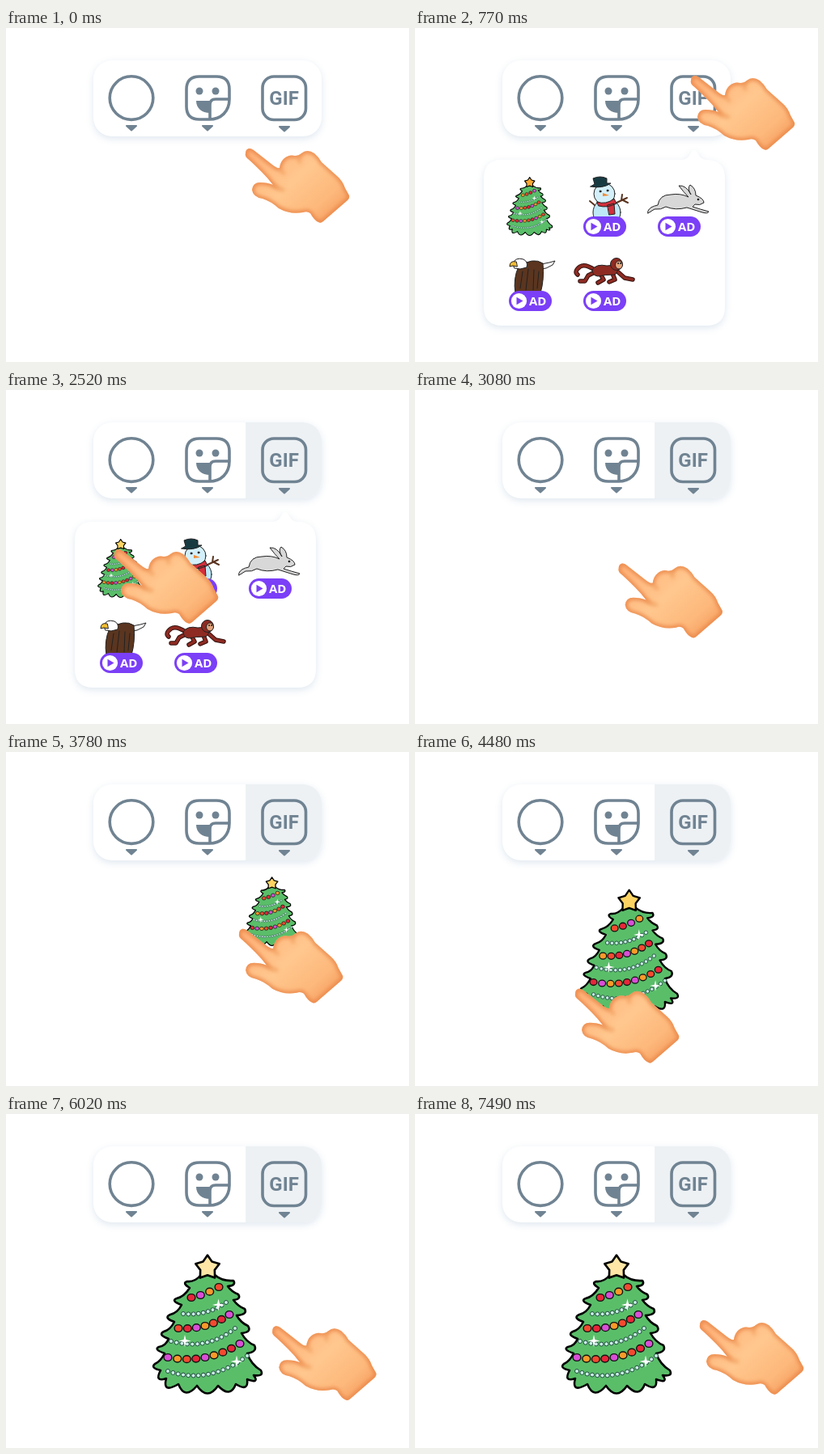
Recreate the animation shown at these times as an HTML page. Size 498 by 413 pixels, loop 7630 ms.

```html
<!DOCTYPE html>
<html lang="en">
<head>
<meta charset="utf-8">
<title>Sticker picker</title>
<style>
html, body { margin: 0; width: 100%; height: 100%; overflow: hidden; background: #fff; }
svg { display: block; width: 498px; height: 413px; }
.card { fill: #fff; filter: drop-shadow(0 3px 5px #e0e8f0); }
.icon { fill: none; stroke: #708392; stroke-width: 3.6; stroke-linejoin: round; stroke-linecap: round; }
.solid { fill: #708392; }
.gif { font: bold 24px Roboto, Arial, sans-serif; }
.ad { font: bold 15px "Open Sans", Arial, sans-serif; fill: #fff; }
.ink { stroke: #000; stroke-linejoin: round; stroke-linecap: round; }
.thin { stroke: #222; stroke-width: 1; stroke-linejoin: round; stroke-linecap: round; }
</style>
</head>
<body>
<svg viewBox="0 0 498 413">
  <defs>
    <clipPath id="barClip"><rect x="108" y="40" width="282" height="94" rx="23"/></clipPath>
    <linearGradient id="skin" x1="0" y1="0" x2="1" y2=".8">
      <stop offset="0" stop-color="#ffb077"/>
      <stop offset=".5" stop-color="#ffc78e"/>
      <stop offset=".8" stop-color="#fdb87b"/>
      <stop offset="1" stop-color="#f59e5f"/>
    </linearGradient>
    <filter id="soft" x="-20%" y="-20%" width="140%" height="140%"><feGaussianBlur stdDeviation="2.4"/></filter>
    <path id="handShape" d="M1 7C1 1 6-1 11 3L34 21Q40 26 43 25Q44 17 49 13Q55 8 62 10Q67 10 70 7Q77 1 86 7Q92 12 95 18L114 35Q121 41 124 50L129 59Q130 62 127 65L97 91Q94 94 91 92Q86 90 81 81Q77 78 72 80Q56 83 42 75Q32 66 22 63Q10 61 9 52Q10 43 19 43Q28 43 35 46Q29 38 21 30Q8 17 3 13Q0 10 1 7Z"/>
    <clipPath id="handClip"><use href="#handShape"/></clipPath>
    <g id="badge">
      <rect width="53" height="25" rx="12.5" fill="#7b3ff7"/>
      <circle cx="12.5" cy="12.5" r="9.6" fill="#fff"/>
      <path d="M9.5 7.8L17.5 12.5L9.5 17.2Z" fill="#7b3ff7"/>
      <text class="ad" x="25" y="18">AD</text>
    </g>
    <g id="tree">
      <path class="ink" fill="#5abe69" stroke-width="2.6" d="M240 200Q233 208 224 207Q217 209 227 215Q220 226 211 228Q203 231 217 236Q212 246 203 248Q194 252 208 257Q203 267 195 269Q187 273 201 278Q197 287 189 288Q182 291 196 296Q191 306 184 309Q178 314 191 317Q183 332 198 327Q193 346 213 334Q221 354 236 336Q249 355 262 336Q277 352 284 334Q300 344 298 328Q314 334 306 323Q319 325 315 317Q303 310 298 296Q311 294 307 286Q297 282 291 271Q304 270 299 262Q290 258 285 249Q299 248 295 241Q287 238 281 230Q291 229 287 223Q279 220 274 213Q285 212 281 206Q267 207 258 199Z"/>
      <g id="lights"></g>
      <path id="star" class="ink" stroke-width="2.6"/>
      <path id="sparkles" fill="#fff"/>
    </g>
  </defs>

  <rect class="card" x="108" y="40" width="282" height="94" rx="23"/>
  <g clip-path="url(#barClip)"><rect id="highlight" x="296" y="40" width="94" height="94" fill="#edf1f4"/></g>
  <g class="icon">
    <circle cx="155" cy="86.6" r="26.8"/>
    <path d="M276 88V76Q276 60 260 60H239Q223 60 223 76V97Q223 113 239 113H251C266 113 276 103 276 88H259Q252 88 252 95V113"/>
    <rect x="317" y="60" width="53.5" height="53.5" rx="14"/>
  </g>
  <g class="solid">
    <circle cx="239" cy="78" r="4.5"/><circle cx="259" cy="78" r="4.5"/>
    <path d="M235 90H252V105C242 105 235 99 235 90Z"/>
    <path stroke="#708392" stroke-width="2" stroke-linejoin="round" d="M149 121H161L155 126.5ZM243 121H255L249 126.5ZM338 122H350L344 127.5Z"/>
    <text class="gif" x="343.6" y="95.3" text-anchor="middle">GIF</text>
  </g>

  <g id="panel">
    <path class="card" d="M107 163H330Q336 163 340 156Q345 146 350 156Q354 163 360 163Q383 163 383 186V345Q383 368 360 368H108Q85 368 85 345V186Q85 163 107 163Z"/>
    <use id="smallTree" href="#tree"/>
    <g class="thin">
      <path fill="none" stroke="#5a3420" stroke-width="2" d="M247 217L262 210M255 213L256 206M257 213L263 216M222 219L216 214"/>
      <circle cx="237" cy="228" r="17" fill="#bfe8f7"/>
      <circle cx="234" cy="205" r="13" fill="#d3f0fa"/>
      <path fill="#d32f3c" d="M225 215Q236 219 246 211L249 217Q238 223 227 220ZM238 219L246 217L247 230L240 231Z"/>
      <path fill="#183b42" d="M217 196L222 193L220 186Q229 182 237 186L237 192L242 192Q232 199 217 196Z"/>
      <path fill="#f08a32" stroke="none" d="M232 204L240 207L232 208Z"/>
      <circle cx="229" cy="202" r="1"/><circle cx="238" cy="201" r="1"/>
    </g>
    <path class="thin" fill="#d8d8d8" d="M288 226Q290 221 300 219Q302 206 316 206Q328 204 338 209Q332 203 326 195Q335 194 341 206Q336 198 340 194Q347 198 347 207Q357 211 357 216Q352 220 346 218L343 221Q352 224 363 227Q362 230 355 228L336 222Q322 226 310 221Q304 225 296 224L288 229Z"/>
    <circle cx="350" cy="212" r="1.3"/>
    <g class="thin">
      <path fill="#fff" d="M156 292L166 290L173 288L170 293L162 297L155 298Z"/>
      <path fill="#5b351f" d="M128 295Q146 283 158 291Q160 310 155 328H124Q121 310 128 295Z"/>
      <path fill="none" d="M133 301L130 322M140 298L137 324M147 299L146 324M153 301L151 322"/>
      <path fill="#fff" d="M121 291Q124 283 134 286Q140 289 138 296L130 298L123 297Z"/>
      <path fill="#f2bd35" d="M125 289Q117 287 117 295L121 294L126 295Z"/>
    </g>
    <g fill="none" stroke-linecap="round" stroke-linejoin="round">
      <path id="limbs" d="M222 299Q210 291 204 295Q196 301 201 305M224 301L214 306L210 313H204M229 304L233 311L226 315M243 301L247 311L240 314M249 300L259 309L269 311"/>
      <use href="#limbs" stroke="#32100d" stroke-width="5.5"/>
      <use href="#limbs" stroke="#8e2b22" stroke-width="3.5"/>
    </g>
    <g class="thin">
      <path fill="#8e2b22" d="M219 299Q224 291 237 294L248 293Q254 299 247 305Q234 305 226 307Q219 306 219 299Z"/>
      <circle cx="249" cy="292" r="7.5" fill="#8e2b22"/>
      <ellipse cx="252" cy="293" rx="4.5" ry="5" fill="#e3a37c"/>
      <circle cx="251" cy="291" r=".5"/><circle cx="254" cy="291" r=".5"/>
    </g>
    <use href="#badge" x="208" y="233"/><use href="#badge" x="300" y="233"/>
    <use href="#badge" x="116" y="325"/><use href="#badge" x="208" y="325"/>
  </g>

  <use id="bigTree" href="#tree"/>
  <g id="hand">
    <use href="#handShape" fill="url(#skin)"/>
    <g clip-path="url(#handClip)">
      <use href="#handShape" fill="none" stroke="#ea8648" stroke-width="5" filter="url(#soft)"/>
      <path d="M35 46Q43 52 48 52M43 25Q44 29 49 32M69 7Q66 12 68 18" fill="none" stroke="#ee9857" stroke-width="3" stroke-linecap="round" filter="url(#soft)"/>
    </g>
  </g>
</svg>
<script>
const LOOP = 7630, STEP = 70;
const $ = id => document.getElementById(id);
const lerp = (a, b, p) => a + (b - a) * p;
const clamp = p => Math.min(1, Math.max(0, p));
const inOut = p => p < .5 ? 2 * p * p : 1 - 2 * (1 - p) ** 2;
const speedUp = p => p ** 1.45;

const bulbColors = ['#f24a30', '#e8263a', '#d94fd6', '#f99a2b'];
const starColors = ['#fee7a6', '#fdd463', '#f7a832', '#fdd463'];
const bulbs = [];

// Places beads along a quadratic curve.
function garland([x0, y0, cx, cy, x1, y1], n, make) {
  for (let i = 0; i < n; i++) {
    const p = i / (n - 1);
    const x = lerp(lerp(x0, cx, p), lerp(cx, x1, p), p);
    const y = lerp(lerp(y0, cy, p), lerp(cy, y1, p), p);
    make(x, y, i);
  }
}
function dot(x, y, rx, ry, fill, stroke, width) {
  const el = document.createElementNS('http://www.w3.org/2000/svg', 'ellipse');
  const attrs = { cx: x, cy: y, rx, ry, fill, stroke, 'stroke-width': width };
  for (const k in attrs) el.setAttribute(k, attrs[k]);
  return $('lights').appendChild(el);
}
function starPath(x, y, points, outer, inner) {
  const at = i => {
    const a = Math.PI * (i / points - .5), r = i % 2 ? inner : outer;
    return `${x + r * Math.cos(a)} ${y + r * Math.sin(a)}`;
  };
  return 'M' + Array.from({ length: 2 * points }, (_, i) => at(i)).join('L') + 'Z';
}

const pearl = (x, y) => dot(x, y, 2.5, 2.5, '#c9eee6', '#1f4a3c', 1);
garland([219, 247, 248, 250, 272, 233], 10, pearl);
garland([204, 281, 248, 293, 283, 265], 14, pearl);
garland([200, 318, 251, 335, 298, 299], 17, pearl);
const bulb = offset => (x, y, i) =>
  bulbs.push({ el: dot(x, y, 4.9, 4.4, 'none', '#111', 1.4), index: i + offset });
garland([229, 227, 246, 223.5, 263, 214], 4, bulb(1));
garland([213, 265, 247.5, 267.5, 276, 248], 7, bulb(0));
garland([200, 301, 247.5, 309.5, 289, 284], 9, bulb(2));
$('star').setAttribute('d', starPath(249, 190, 5, 15.5, 9.3));
$('sparkles').setAttribute('d', [[262.5, 236], [221, 280.5], [285, 306]].map(([x, y]) => starPath(x, y, 4, 7.5, 2)).join(''));

// time, x, y, easing towards this point
const path = [
  [0, 295, 148], [630, 340, 58], [840, 340, 58], [1940, 133, 196], [2590, 133, 196],
  [3360, 293, 220], [3710, 288, 217], [4830, 175, 310], [5320, 175, 310],
  [6090, 351, 254, speedUp], [LOOP, 351, 254]
];
function handAt(t) {
  const i = path.findIndex(k => k[0] > t);
  const [t0, x0, y0] = path[i - 1], [t1, x1, y1, ease = inOut] = path[i];
  const p = ease((t - t0) / (t1 - t0));
  return [lerp(x0, x1, p), lerp(y0, y1, p)];
}

const blinks = [6090, 6300, 6510, 6650, 6790, 7000, 7280, 7490];
function blinkState(t) {
  if (t >= 5880) return blinks.filter(b => b <= t).length % 4;
  if (t > 4830 && t < 5320) t = 4830;
  return (Math.floor((t - 5880) / 200) + 80) % 4;
}

function placeTree(el, x, top, scale) {
  el.setAttribute('transform', `translate(${x} ${top}) scale(${scale}) translate(-248.5 -173)`);
}
const show = (id, on) => $(id).setAttribute('visibility', on ? 'visible' : 'hidden');

function draw(now) {
  const t = Math.floor(now % LOOP / STEP) * STEP;
  const state = blinkState(t);
  for (const b of bulbs) b.el.setAttribute('fill', bulbColors[(b.index - state + 4) % 4]);
  $('star').setAttribute('fill', starColors[state]);

  show('highlight', t >= 1610);
  show('panel', t >= 700 && t < 2660);
  show('bigTree', t >= 3150);
  const grow = inOut(clamp((t - 3710) / 1120));
  placeTree($('bigTree'), lerp(329, 248.5, grow), lerp(154, 173, grow), lerp(.49, 1, grow));
  $('hand').setAttribute('transform', `translate(${handAt(t)})`);
}

placeTree($('smallTree'), 141.5, 184, .42);
const start = performance.now();
function tick() {
  draw(performance.now() - start);
  requestAnimationFrame(tick);
}
tick();
</script>
</body>
</html>
```
